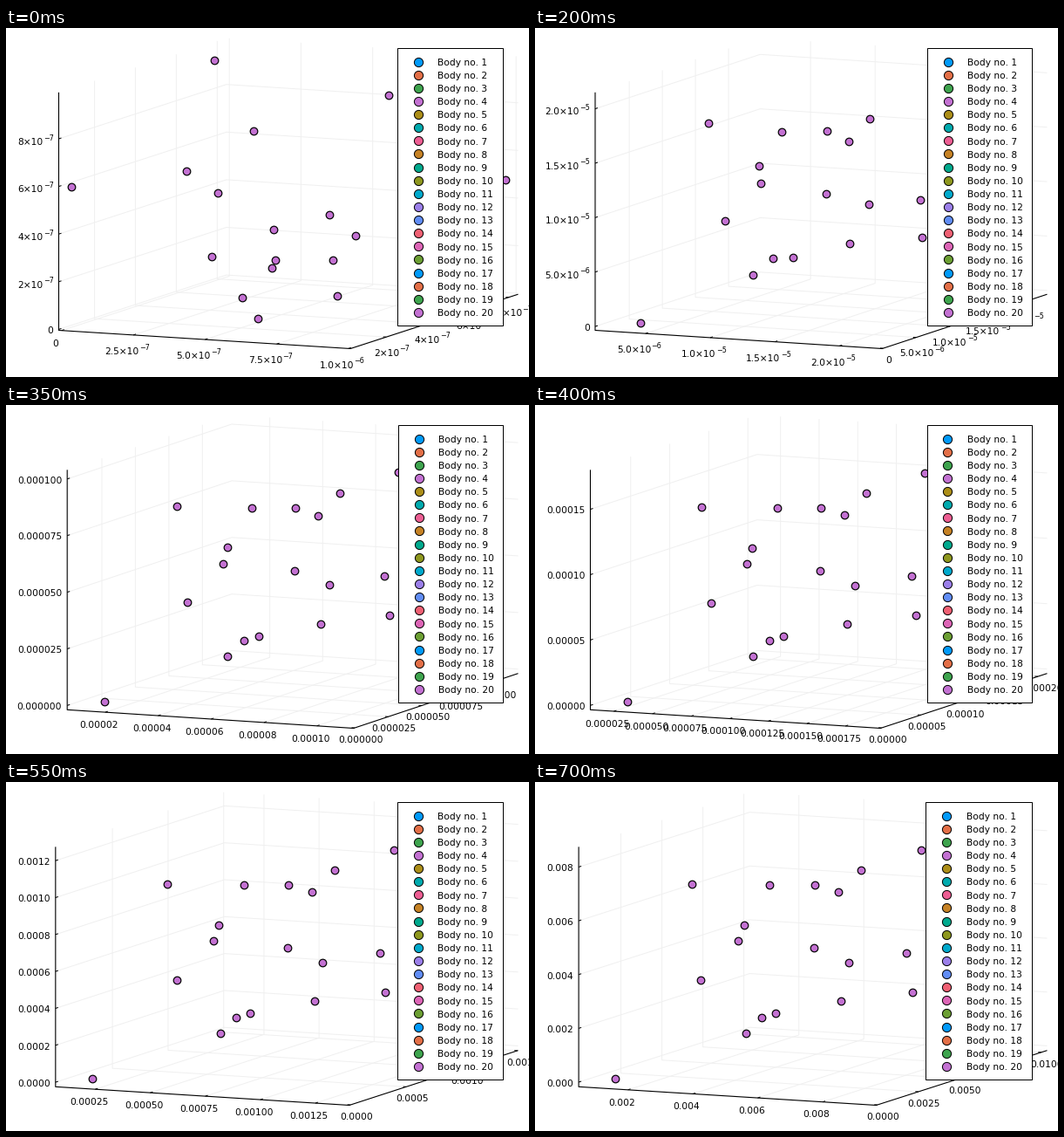
These frames come from a looping animation (600 by 400 pixels, 750 ms). A matplotlib script:

```python
import math

import matplotlib.pyplot as plt
import numpy as np
from matplotlib.animation import FuncAnimation
from matplotlib.patches import Rectangle

W, H, DPI = 600, 400, 100
PX = 72 / DPI
FRAMES, INTERVAL = 15, 50
FONT = 10.6
TOP, RIGHT = 12, 588
GRID = "#f0f0f0"

plt.rcParams["font.family"] = "DejaVu Sans"

COLORS = ["#009AFA", "#E36F47", "#3EA44E", "#C371D2", "#AC8E18", "#00AAAE",
          "#ED5E93", "#C68225", "#00A98D", "#8E971E", "#00A9CC", "#9B7FE9",
          "#618DF6", "#F06073", "#DD65B6", "#6C9F33"]
BODY = COLORS[3]

# Extent of the cloud along x at a few steps; it grows geometrically between
SIZE_STEPS = [0, 4, 6, 8, 10, 12, 14]
SIZES = [1.007e-6, 2.33e-5, 6.56e-5, 1.976e-4, 6.89e-4, 2.86e-3, 9.65e-3]

# Axis lows and highs relative to that extent, for x, y and z
START_LIMITS = np.array([[-.01, 1], [.025, .839], [-.004, .988]])
LATE_LIMITS = np.array([[.05, 1], [-.008, 1.073], [-.018, .906]])

# Stage position of each body at the start, and once fully expanded
BODIES = [
    ((380, 308), (99, 340)), ((239, 37), (186, 118)),
    ((237, 262), (274, 118)), ((308, 231), (325, 118.5)),
    ((290, 333), (352, 126)), ((271.5, 309), (377.5, 101)),
    ((440, 77.5), (445, 79)), ((284.5, 118), (245, 165)),
    ((493, 154), (238, 183)), ((477, 161), (196, 227.5)),
    ((310, 266.5), (324, 190.5)), ((573.5, 174), (363, 207.5)),
    ((460, 309), (429, 196)), ((376, 266.5), (435, 241.5)),
    ((244, 189.5), (355, 252)), ((401.5, 239), (280.5, 266)),
    ((207.5, 164.5), (265, 271)), ((76, 182.5), (246.5, 289)),
    ((372, 214), (520, 150)), ((305.5, 275.5), (500, 270)),
]


def normalise(points, left, bottom):
    origin = np.array([left, TOP])
    return (points - origin) / (np.array([RIGHT, bottom]) - origin)


START = normalise(np.array([b[0] for b in BODIES]), 61, 368)
LATE = normalise(np.array([b[1] for b in BODIES]), 57.5, 371)
# How the rescaling axes carry the bodies along while the cloud is small
CARRY = LATE * (.35, .27) + (.07, .50)


def cloud_size(step):
    return math.exp(np.interp(step, SIZE_STEPS, np.log(SIZES)))


def limits(size):
    weight = SIZES[0] / size
    mix = np.array([weight, weight, math.sqrt(weight)])[:, None]
    return size * (LATE_LIMITS + (START_LIMITS - LATE_LIMITS) * mix)


def positions(size):
    weight = SIZES[0] / size
    carry = CARRY + (LATE - CARRY) * weight
    return LATE + (START - carry) * weight


def choose_ticks(low, high):
    """Score candidate steps by count, coverage, zero and roundness."""
    span = high - low
    order = math.floor(math.log10(span))
    candidates = [(q * 10.0 ** z, score) for z in (order, order - 1)
                  for q, score in ((5, .9), (3, .2), (2.5, .5), (2, .7), (1, 1))]
    best, ticks = -1, None
    for size, nice in candidates:
        first = math.ceil(low / size - 1e-9)
        last = math.floor(high / size + 1e-9)
        n = last - first + 1
        if not 4 <= n <= 8:
            continue
        score = ((1 - abs(n - 5) / 5) / 4 + (first <= 0 <= last) / 6
                 + span / ((n - 1) * size) / 2 + nice / 4)
        if score > best + 1e-9:
            best, ticks = score, np.arange(first, last + 1) * size
    return ticks


def decimals(values):
    return next(d for d in range(12)
                if all(abs(v * 10 ** d - round(v * 10 ** d)) < 1e-6
                       for v in values))


def make_labels(ticks):
    """Return (base, exponent) pairs, whether scientific, and the decimals."""
    if ticks[-1] >= 9.9e-5:
        d = decimals(ticks)
        return [(f"{abs(t):.{d}f}", "") for t in ticks], False, d
    powers = [math.floor(math.log10(t) + 1e-9) if t > 0 else 0 for t in ticks]
    parts = [t / 10.0 ** p for t, p in zip(ticks, powers)]
    d = decimals(parts)
    labels = [(f"{m:.{d}f}×10", f"\u2212{-p}") if t > 0 else ("0", "")
              for t, m, p in zip(ticks, parts, powers)]
    return labels, True, d


fig = plt.figure(figsize=(W / DPI, H / DPI), dpi=DPI, facecolor="white")
ax = fig.add_axes([0, 0, 1, 1])


def line(*points, color="black", width=1.0, z=2):
    xs, ys = zip(*points)
    ax.plot(xs, ys, color=color, lw=width * PX, zorder=z, solid_capstyle="butt")


def write(x, y, text, ha="center", z=3):
    return ax.text(x, y + 4.3, text, ha=ha, va="baseline",
                   fontsize=FONT * PX, zorder=z)


def tick_label(x, y, label, drop=0, ha="center"):
    """Write a tick label; drop lowers those that carry an exponent."""
    base, power = label
    if not power:
        write(x, y, base, ha)
        return
    room = 12 if ha == "right" else 6
    text = write(x - room, y + drop, base, ha)
    ax.annotate(power, (1, 0), xycoords=text, xytext=(.3 * PX, 7.3 * PX),
                textcoords="offset points", ha="left", va="baseline",
                fontsize=.75 * FONT * PX, zorder=3, annotation_clip=False)


def draw_legend(left):
    shift = (left - 61) * .1
    x = 449.7 + shift
    ax.add_patch(Rectangle((x, 23.7), 570.7 - x, 317.3, fc="white", ec="black",
                           lw=PX, zorder=6))
    for i in range(20):
        y = 39.1 + 15.12 * i
        ax.plot([473.5 + shift], [y], "o", ms=10.2 * PX, mew=PX, mec="black",
                mfc=COLORS[i % len(COLORS)], zorder=7)
        write(495.9 + shift / 2, y, f"Body no. {i + 1}", "left", 7)


def draw(step):
    ax.clear()
    ax.set(xlim=(.5, W + .5), ylim=(H + .5, .5))
    ax.axis("off")

    size = cloud_size(step)
    lims = limits(size)
    ticks = [choose_ticks(*lim) for lim in lims]
    fracs = [(t - lo) / (hi - lo) for t, (lo, hi) in zip(ticks, lims)]
    labels = [make_labels(t) for t in ticks]

    # The box makes room for the labels around it
    _, sci, digits = labels[2]
    left = 61 + 8.5 * digits if sci else 30.5 + 6.7 * digits
    bottom = 368 if labels[0][1] else 371
    wide, tall = RIGHT - left, bottom - TOP
    vx = np.array([.635 * wide, .059 * tall])
    vy = np.array([.365 * wide, -.175 * tall])
    vz = np.array([0, -.766 * tall])
    origin = np.array([left, bottom - vx[1]])

    def at(x, y, z):
        return origin + x * vx + y * vy + z * vz

    for f in fracs[0]:
        line(at(f, 0, 0), at(f, 1, 0), at(f, 1, 1), color=GRID, z=1)
    for f in fracs[1]:
        line(at(1, f, 0), at(0, f, 0), at(0, f, 1), color=GRID, z=1)
    for f in fracs[2]:
        line(at(0, 0, f), at(0, 1, f), at(1, 1, f), color=GRID, z=1)

    line(at(0, 0, 1), at(0, 0, 0), at(1, 0, 0), at(1, 1, 0), width=1.1)

    for f, label in zip(fracs[0], labels[0][0]):
        x, y = at(f, 0, 0)
        line((x, y), (x + 3, y - 1))
        tick_label(x - 7.3, y + 13.5, label, drop=4.5)
    for f, label in zip(fracs[1], labels[1][0]):
        x, y = at(1, f, 0)
        line((x, y), (x - 3.5, y - .2))
        tick_label(x + 6.5, y + 12.7, label, drop=4.5)
    for f, label in zip(fracs[2], labels[2][0]):
        x, y = at(0, 0, f)
        line((x, y), (x + 3, y - 1))
        tick_label(x - 6, y + .5, label, drop=2, ha="right")

    spots = positions(size) * (wide, tall) + (left, TOP)
    ax.plot(spots[:, 0], spots[:, 1], "o", ms=8.6 * PX, mew=1.2 * PX,
            mec="black", mfc=BODY, zorder=5, antialiased=False)
    draw_legend(left)
    return ax.get_children()


anim = FuncAnimation(fig, draw, frames=FRAMES, init_func=lambda: draw(0),
                     interval=INTERVAL, repeat=True, repeat_delay=0)
plt.show()
```
